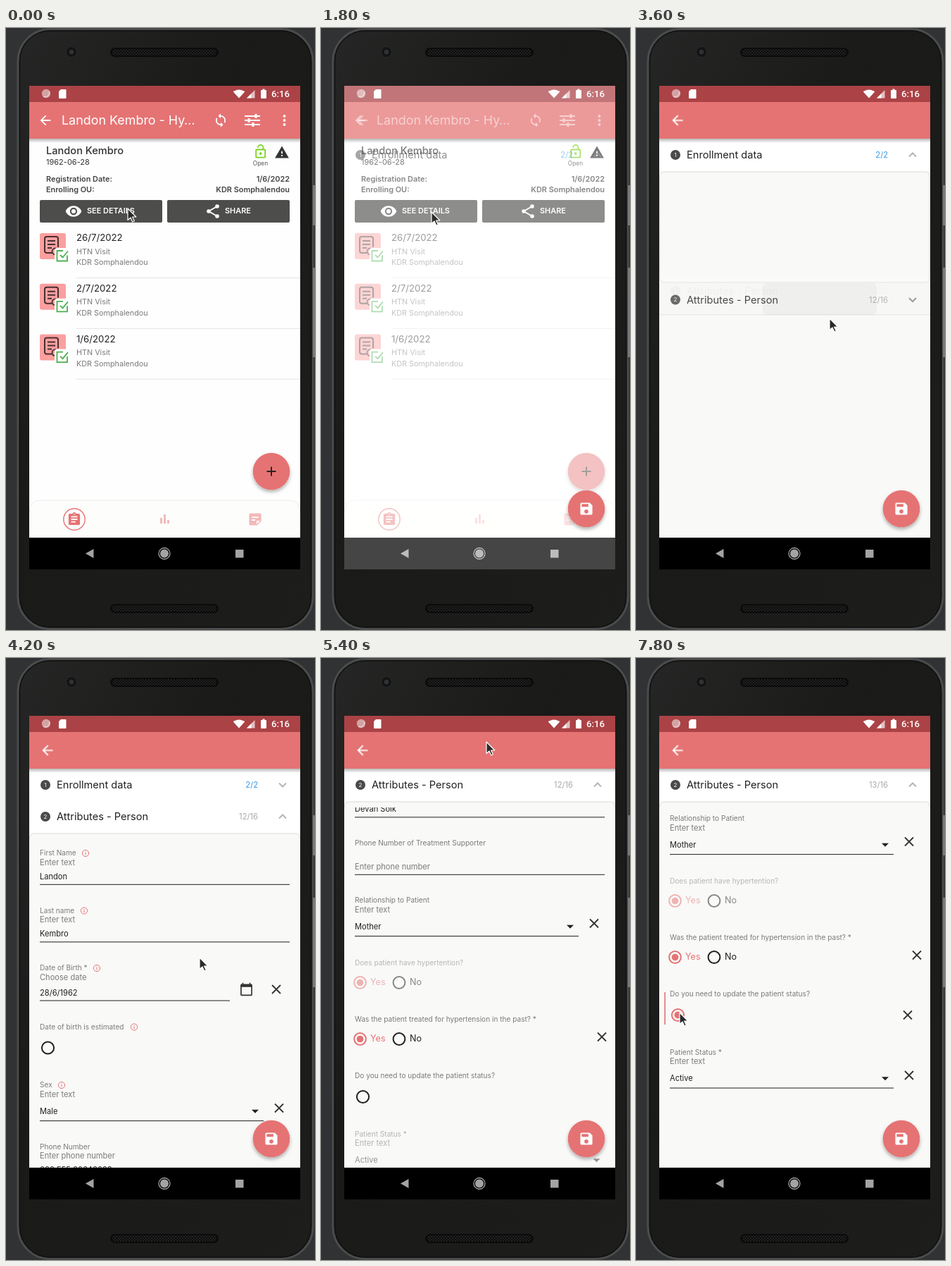
Animation, 439 px wide and 854 px high, one loop 8000 ms. Source, as an HTML page:

```html
<!DOCTYPE html>
<html lang="en">
<head>
<meta charset="utf-8">
<title>Patient enrollment form</title>
<style>
html, body { margin: 0; width: 100%; height: 100%; overflow: hidden; background: #303233; }
svg { display: block; width: 439px; height: 854px; }
text { font-family: Inter, Roboto, sans-serif; white-space: pre; }

.cursor, .flash, .old, .old-head, .old-title, .old-main, .fade, .bg, .save, .panel, .closed, .ripple,
.open, .fields, .head1, .head2, .up1, .down1, .off, .on {
  animation: 8s step-end infinite;
}
.cursor { animation-name: cursor; }
.flash { animation-name: flash; }
.old { animation-name: old; }
.old-head { animation-name: old-head; }
.old-title { animation-name: old-title; }
.old-main { animation-name: old-main; }
.fade { animation-name: fade; }
.bg { animation-name: bg; }
.save { animation-name: save; }
.panel { animation-name: panel; }
.closed { animation-name: closed; }
.ripple { animation-name: ripple; }
.open { animation-name: open; }
.fields { animation-name: fields; }
.head1 { animation-name: head1; }
.head2 { animation-name: head2; }
.up1 { animation-name: up1; }
.down1 { animation-name: down1; }
.off { animation-name: off; }
.on { animation-name: on; }

@keyframes cursor {
  0% { transform: translate(173px, 256px); }
  1.25% { transform: translate(156px, 256px); }
  5% { transform: translate(145px, 258px); }
  6.25% { transform: translate(124px, 262px); }
  7.5% { transform: translate(113px, 268px); }
  8.75% { transform: translate(130px, 266px); }
  10% { transform: translate(165px, 263px); }
  11.25% { transform: translate(189px, 262px); }
  12.5% { transform: translate(156px, 268px); }
  15% { transform: translate(156px, 264px); }
  16.25% { transform: translate(157px, 261px); }
  30% { transform: translate(170px, 275px); }
  31.25% { transform: translate(200px, 330px); }
  32.5% { transform: translate(238px, 392px); }
  33.75% { transform: translate(270px, 430px); }
  35% { transform: translate(275px, 412px); }
  52.5% { transform: translate(275px, 425px); }
  53.75% { transform: translate(273px, 470px); }
  55% { transform: translate(270px, 530px); }
  56.25% { transform: translate(268px, 580px); }
  57.5% { transform: translate(267px, 606px); }
  58.75% { transform: translate(267px, 612px); }
  61.25% { transform: translate(267px, 531px); }
  62.5% { transform: translate(250px, 85px); }
  65% { transform: translate(238px, 4px); }
  67.5% { transform: translate(235px, 119px); }
  68.75% { transform: translate(215px, 200px); }
  70% { transform: translate(180px, 290px); }
  71.25% { transform: translate(140px, 380px); }
  72.5% { transform: translate(95px, 450px); }
  73.75% { transform: translate(55px, 500px); }
  75% { transform: translate(25px, 530px); }
  76.25% { transform: translate(8px, 539px); }
  77.5% { transform: translate(4px, 539px); }
  78.75% { transform: translate(14px, 534px); }
  80% { transform: translate(42px, 520px); }
  81.25% { transform: translate(70px, 508px); }
  82.5% { transform: translate(75px, 505px); }
  83.75%, 100% { transform: translate(62px, 503px); }
}

/* screen change */
@keyframes flash { 0% { opacity: 0; } 20% { opacity: .06; } 21.25% { opacity: .15; } 22.5% { opacity: .27; } 23.75% { opacity: .13; } 25%, 100% { opacity: 0; } }
@keyframes old { 0% { visibility: visible; } 25%, 100% { visibility: hidden; } }
@keyframes old-head { 0% { opacity: 1; } 21.25% { opacity: .95; } 22.5% { opacity: .88; } 23.75% { opacity: .5; } 25%, 100% { opacity: 0; } }
@keyframes old-title { 0% { opacity: 1; } 20% { opacity: .95; } 21.25% { opacity: .8; } 22.5% { opacity: .55; } 23.75% { opacity: .2; } 25%, 100% { opacity: 0; } }
@keyframes old-main { 0% { opacity: 1; } 20% { opacity: .95; } 21.25% { opacity: .8; } 22.5% { opacity: .6; } 23.75% { opacity: .25; } 25%, 100% { opacity: 0; } }
@keyframes fade { 0% { opacity: 0; } 21.25% { opacity: .2; } 22.5% { opacity: .5; } 23.75% { opacity: .8; } 25%, 100% { opacity: 1; } }
@keyframes bg { 0% { opacity: 0; } 23.75% { opacity: .7; } 25%, 100% { opacity: 1; } }
@keyframes save { 0% { opacity: 0; } 21.25% { opacity: .5; } 22.5%, 100% { opacity: 1; } }

/* second section opens */
@keyframes panel { 0% { opacity: 0; } 23.75% { opacity: .7; } 25% { opacity: 1; } 46.25% { opacity: .3; } 47.5%, 100% { opacity: 0; } }
@keyframes closed { 0% { opacity: 0; } 23.75% { opacity: .7; } 25% { opacity: 1; } 45% { opacity: .8; } 46.25% { opacity: .3; } 47.5%, 100% { opacity: 0; } }
@keyframes ripple { 0% { opacity: 0; } 45% { opacity: 1; } 46.25%, 100% { opacity: 0; } }
@keyframes open { 0% { opacity: 0; } 45% { opacity: .18; } 46.25% { opacity: .5; } 47.5% { opacity: .8; } 48.75%, 100% { opacity: 1; } }
@keyframes up1 { 0% { opacity: 1; } 46.25%, 100% { opacity: 0; } }
@keyframes down1 { 0% { opacity: 0; } 46.25%, 100% { opacity: 1; } }

/* scrolling */
@keyframes head1 { 0% { transform: none; } 61.25% { transform: translateY(-18px); } 62.5%, 100% { transform: translateY(-60px); } }
@keyframes head2 {
  0% { transform: translateY(193px); }
  46.25% { transform: translateY(130px); }
  47.5% { transform: translateY(70px); }
  48.75% { transform: translateY(45px); }
  61.25% { transform: translateY(27px); }
  62.5%, 100% { transform: none; }
}
@keyframes fields {
  0% { transform: translateY(148px); visibility: hidden; }
  46.25% { transform: translateY(85px); visibility: visible; }
  47.5% { transform: translateY(25px); }
  48.75% { transform: none; }
  61.25% { transform: translateY(-18px); }
  62.5% { transform: translateY(-465px); }
  65% { transform: translateY(-545px); }
  67.5% { transform: translateY(-594px); }
  68.75% { transform: translateY(-640px); }
  70% { transform: translateY(-676px); }
  71.25% { transform: translateY(-698px); }
  72.5% { transform: translateY(-708px); }
  73.75%, 100% { transform: translateY(-710px); visibility: visible; }
}

/* status switched on */
@keyframes off { 0% { opacity: 1; } 93.75% { opacity: .75; } 95% { opacity: .5; } 96.25% { opacity: .25; } 97.5%, 100% { opacity: 0; } }
@keyframes on { 0% { opacity: 0; } 93.75% { opacity: .25; } 95% { opacity: .5; } 96.25% { opacity: .75; } 97.5%, 100% { opacity: 1; } }
</style>
</head>
<body>
<script>
const RED = '#e57373', INK = '#212121', GREY = '#7b7b7b', PAPER = '#f9f9f8';

const PATHS = {
  back: 'M20 11H7.83l5.59-5.59L12 4l-8 8 8 8 1.41-1.41L7.83 13H20z',
  sync: 'M12 4V1L8 5l4 4V6c3.31 0 6 2.69 6 6 0 1.01-.25 1.97-.7 2.8l1.46 1.46A7.93 7.93 0 0 0 20 12c0-4.42-3.58-8-8-8zm0 14c-3.31 0-6-2.69-6-6 0-1.01.25-1.97.7-2.8L5.24 7.74A7.93 7.93 0 0 0 4 12c0 4.42 3.58 8 8 8v3l4-4-4-4z',
  lock: 'M12 17a2 2 0 1 0 0-4 2 2 0 0 0 0 4zm6-9h-1V6A5 5 0 0 0 7 6h1.900a3.100 3.100 0 0 1 6.200 0v2H6a2 2 0 0 0-2 2v10a2 2 0 0 0 2 2h12a2 2 0 0 0 2-2V10a2 2 0 0 0-2-2zm0 12H6V10h12z',
  eye: 'M12 4.5C7 4.5 2.73 7.61 1 12c1.73 4.39 6 7.5 11 7.5s9.27-3.11 11-7.5c-1.73-4.39-6-7.5-11-7.5zM12 17a5 5 0 1 1 0-10 5 5 0 0 1 0 10zm0-8a3 3 0 1 0 0 6 3 3 0 0 0 0-6z',
  warn: 'M1 21h22L12 2zm12-3h-2v-2h2zm0-4h-2v-4h2z',
  task: 'M19 3h-4.18C14.4 1.84 13.3 1 12 1s-2.4.84-2.82 2H5a2 2 0 0 0-2 2v14a2 2 0 0 0 2 2h14a2 2 0 0 0 2-2V5a2 2 0 0 0-2-2zm-7 0a1 1 0 1 1 0 2 1 1 0 0 1 0-2zm2 14H7v-2h7zm3-4H7v-2h10zm0-4H7V7h10z',
  note: 'M19 3H5a2 2 0 0 0-2 2v14a2 2 0 0 0 2 2h10l6-6V5a2 2 0 0 0-2-2zM7 8h10v2H7zm5 6H7v-2h5zm2 5.5V14h5.5z',
  save: 'M17 3H5a2 2 0 0 0-2 2v14a2 2 0 0 0 2 2h14a2 2 0 0 0 2-2V7zm-5 16a3 3 0 1 1 0-6 3 3 0 0 1 0 6zm3-10H5V5h10z',
  date: 'M20 3h-1V1h-2v2H7V1H5v2H4a2 2 0 0 0-2 2v16c0 1.1.9 2 2 2h16a2 2 0 0 0 2-2V5a2 2 0 0 0-2-2zm0 18H4V8h16z',
  wifi: 'M12 21L0 7.5C3 5 7.3 3 12 3s9 2 12 4.5z'
};

const group = (cls, ...parts) => `<g class="${cls}">${parts.join('')}</g>`;
const rect = (x, y, w, h, fill, more = '') => `<rect x="${x}" y="${y}" width="${w}" height="${h}" fill="${fill}" ${more}/>`;
const dot = (x, y, r, fill, more = '') => `<circle cx="${x}" cy="${y}" r="${r}" fill="${fill}" ${more}/>`;
const ring = (x, y, r, color, w) => dot(x, y, r, 'none', `stroke="${color}" stroke-width="${w}"`);
const line = (d, color, w, more = '') => `<path d="${d}" fill="none" stroke="${color}" stroke-width="${w}" ${more}/>`;
const shape = (d, fill) => `<path d="${d}" fill="${fill}"/>`;
const text = (x, y, s, size, fill, more = '') => `<text x="${x}" y="${y}" font-size="${size}" fill="${fill}" ${more}>${s}</text>`;
const icon = (name, x, y, k, fill) =>
  `<path transform="translate(${x} ${y}) scale(${k}) translate(-12 -12)" fill-rule="evenodd" d="${PATHS[name]}" fill="${fill}"/>`;
const END = ' text-anchor="end"', MID = ' text-anchor="middle"', MEDIUM = ' font-weight="500"', BOLD = ' font-weight="600"';

function phone() {
  const grille = y => rect(148, y, 154, 13, '#0b0b0b', 'rx="6.5"') + rect(151, y + 2, 148, 9, 'url(#mesh)', 'rx="4.5"');
  return rect(0, 0, 439, 854, '#303233') +
    rect(17, 1.5, 419, 851, 'url(#body)', 'rx="46" stroke="#4a4c4c" stroke-width="3"') +
    rect(19.5, 4, 414, 846, 'none', 'rx="43" stroke="#111" stroke-width="1.5"') +
    rect(436, 223, 3, 57, '#77797a') + rect(436, 340, 3, 127, '#77797a') +
    dot(93, 34, 7.5, '#141414', 'stroke="#2a2a2a" stroke-width="1"') + dot(93, 34, 3.2, '#2f3436') +
    grille(28) + grille(817);
}

function systemBars() {
  return rect(33, 82, 385, 686, '#fefefe') + rect(33, 82, 385, 23, '#ab4246') + rect(33, 105, 385, 52, RED) +
    dot(57, 93, 6.2, '#d3a3a4') + line('M53 97a5.6 5.6 0 0 0 8-7', '#ecd3d3', 1.2) +
    shape('M78 87h6.5q1 0 1 1v11q0 1-1 1h-8.5q-1 0-1-1v-9z', '#fff') +
    icon('wifi', 331, 93.5, .68, '#fff') +
    shape('M342 99.5h11.5V88z', '#e3bfc0') + shape('M342 99.5h6.5v-6.5z', '#fff') +
    rect(362, 88, 8, 12, '#fff', 'rx="1"') + rect(364.5, 86.5, 3, 2, '#fff') +
    text(403, 98, '6:16', 13.2, '#fff', END + MEDIUM + ' style="font-family:Roboto,sans-serif"') +
    rect(33, 723, 385, 45, '#000') +
    shape('M113 745.5l11.5-6.5v13z', '#a3a3a3') +
    dot(225, 745.5, 6, '#a3a3a3') + ring(225, 745.5, 8, '#a3a3a3', 1.3) + rect(326, 740, 11.5, 11.5, '#a3a3a3');
}

const fab = (y, inner) => dot(377, y, 26.3, RED, 'filter="url(#lift)"') + inner;

function visit(i, date) {
  return `<g transform="translate(0 ${i * 71.8})">` +
    rect(48, 291, 37, 37, '#fb9f9f', 'rx="3"') +
    line('M66 319H58q-3 0-3-3V299q0-3 3-3h13q3 0 3 3v12M59 302h11M59 307h11M59 312h6', '#4a2f30', 2) +
    ring(70, 317, 4.5, '#4a2f30', 1.8) +
    rect(69, 312, 21, 21, '#fff', 'rx="4"') +
    line('M81 316h-8.5v14.5h14.5v-8M77 322l3.5 3.5 7.5-9', '#4caf50', 1.8) +
    text(100, 302, date, 13.2, INK) +
    text(100, 320.5, 'HTN Visit', 10.8, GREY) + text(100, 336.3, 'KDR Somphalendou', 10.8, GREY) +
    rect(100, 354, 318, 1, '#e3e3e3') + '</g>';
}

function overview() {
  const button = x => rect(x, 244, 174, 32, '#4d4d4c', 'rx="2"');
  const slider = (y, x) => rect(339, y - 1, 22, 2, '#fff') + rect(x - 1.5, y - 3, 3, 6, '#fff');
  const fact = (y, label, value) => text(57, y, label, 10.9, '#444', BOLD) + text(403, y, value, 10.9, '#444', END + BOLD);
  const title = group('old-title',
    icon('back', 56, 131, .92, '#fff'), text(79, 137, 'Landon Kembro - Hy…', 17.9, '#fff'),
    icon('sync', 305, 131, .88, '#fff'), slider(125, 355), slider(131, 345), slider(137, 351),
    [125, 131, 137].map(y => dot(395.5, y, 1.9, '#fff')).join(''));
  const head = group('old-head',
    text(57, 178.5, 'Landon Kembro', 14.6, '#333', MEDIUM), text(57, 193.5, '1962-06-28', 11, '#333'),
    icon('lock', 361.7, 175.3, .93, '#7ed321'),
    text(361.5, 195, 'Open', 8.4, '#555', MID), icon('warn', 392, 176.5, .9, '#333'),
    fact(218, 'Registration Date:', '1/6/2022'), fact(232.5, 'Enrolling OU:', 'KDR Somphalendou'),
    button(48), button(229), icon('eye', 96, 260, 1.03, '#fff'),
    line('M300 253L288 260l12 7', '#fff', 2), dot(300, 253, 2.8, '#fff'), dot(288, 260, 2.8, '#fff'), dot(300, 267, 2.8, '#fff'),
    text(115, 263.3, 'SEE DETAILS', 10.9, '#fff', BOLD), text(311, 263.3, 'SHARE', 10.9, '#fff', BOLD));
  const main = group('old-main',
    ['26/7/2022', '2/7/2022', '1/6/2022'].map((d, i) => visit(i, d)).join(''),
    shape('M33 723V686q0-16 16-16H402q16 0 16 16v37z', '#fdfdfc'),
    line('M33.5 686q0-16 16-16H401.5q16 0 16 16', '#ececec', 1),
    ring(97, 697, 15.2, RED, 1.4), icon('task', 97, 697, .9, RED),
    rect(219, 695, 3, 8, '#f3b9b9'), rect(224, 690, 3, 13, '#f3b9b9'), rect(229, 698, 3, 5, '#f3b9b9'),
    icon('note', 354, 697, .95, '#f3b9b9'),
    fab(629, line('M370.5 629h13M377 622.5v13', '#2b2222', 2)));
  return group('old', title, main, head);
}

const chevron = (up, cls = '', color = '#b5b5b5') =>
  line(up ? 'M388 182.5l5-5 5 5' : 'M388 177.5l5 5 5-5', color, 2, `class="${cls}"`);

const heading = (n, s) => dot(56, 180, 7, '#4a4a4a') + text(56, 182.8, n, 8, '#fff', MID) + text(72, 185, s, 14.6, INK);
const count = (s, fill, cls = '') => text(358, 184, s, 11.2, fill, `${END} class="${cls}"`);
const panelTop = () => `<path d="M34 212V210Q34 204 40 204H411Q417 204 417 210V212" fill="${PAPER}" stroke="#ebebea" stroke-width="2"/>`;

// Fields: y is the middle of the label.
const small = (x, y, s, fill = GREY) => text(x, y + 3.7, s, 10.1, fill);
const body = (y, s, fill = INK) => text(48, y + 4, s, 11.1, fill);
const cross = (x, y) => line(`M${x - 6} ${y - 6}l12 12m0-12l-12 12`, '#333', 1.8);
const caret = (x, y, fill = INK) => shape(`M${x - 5} ${y - 2.3}h10l-5 5z`, fill);
const rule = (y, end, color = '#333') => rect(48, y - .5, end - 48, 1.1, color);
const info = (x, y) => ring(x, y + .5, 4.6, RED, 1) + rect(x - .5, y - .2, 1, 3.2, RED) + rect(x - .5, y - 2, 1, 1.1, RED);

const entry = (y, label, hint, value, mark) =>
  small(48, y, label) + (mark ? info(mark, y) : '') + body(y + 13, hint, GREY) +
  body(y + 33, value) + rule(y + 44.8, 403);

const choice = (y, label, value, mark) =>
  small(48, y, label) + (mark ? info(mark, y) : '') + body(y + 13, 'Enter text', GREY) + body(y + 37, value) +
  caret(354, y + 37.5) + rule(y + 51, 366) + cross(388, y + 33);

const yesNo = (y, label) =>
  small(48, y, label) + ring(55.5, y + 28.5, 8.4, RED, 2) + dot(55.5, y + 28.5, 4.8, RED) +
  text(70, y + 32, 'Yes', 12.6, RED) + ring(111, y + 28.5, 8.4, INK, 2) + text(126, y + 32, 'No', 12.6, INK);

function fields() {
  return group('fields', group('open',
    entry(276.5, 'First Name', 'Enter text', 'Landon', 113),
    entry(358, 'Last name', 'Enter text', 'Kembro', 111),
    small(48, 439.5, 'Date of Birth *'), info(129, 439.5), body(452.5, 'Choose date', GREY), body(474.5, '28/6/1962'),
    rule(486, 318), icon('date', 341.5, 470, .84, '#333'), cross(384, 470),
    small(48, 523, 'Date of birth is estimated'), info(182, 523), ring(59.5, 553, 8.6, INK, 2),
    choice(605.5, 'Sex', 'Male', 79),
    entry(693, 'Phone Number', 'Enter phone number', '000 555 00640028'),
    entry(775, 'Name of Treatment Supporter', 'Enter text', 'Devan Solk'),
    small(48, 856.5, 'Phone Number of Treatment Supporter'), body(889.5, 'Enter phone number', GREY), rule(901.3, 403),
    choice(937.5, 'Relationship to Patient', 'Mother'),
    `<g opacity=".52">${yesNo(1026, 'Does patient have hypertention?')}</g>`,
    yesNo(1106, 'Was the patient treated for hypertension in the past? *'), cross(399, 1131.5),
    small(48, 1186.5, 'Do you need to update the patient status?'),
    group('off', ring(59.5, 1216.5, 8.6, INK, 2), `<g opacity=".55">`,
      small(48, 1269, 'Patient Status *'), body(1282, 'Enter text', GREY), body(1306, 'Active', '#444'),
      caret(391.5, 1306.5, '#444'), rule(1320, 403), '</g>'),
    group('on', rect(40.3, 1184, 1.6, 46, RED), ring(59.5, 1216.5, 8.6, RED, 2), dot(59.5, 1216.5, 5, RED), cross(386, 1216.5),
      choice(1269, 'Patient Status *', 'Active'))));
}

function form() {
  const first = group('head1', group('bg', rect(33, 157, 385, 46, '#fff')),
    group('fade', heading(1, 'Enrollment data'), count('2/2', '#3d9be9'),
      chevron(true, 'up1'), chevron(false, 'down1')));
  const panel = group('panel', rect(34, 204, 383, 157, PAPER, 'rx="6" stroke="#ebebea" stroke-width="2"'));
  const closed = group('closed', rect(33, 362, 385, 45, '#fdfdfc'), rect(33, 406, 385, 1.5, '#ececeb'),
    `<g transform="translate(0 205.5)">${heading(2, 'Attributes - Person')}${count('12/16', '#aaa')}${chevron(false, '', '#8a8a8a')}</g>`);
  const ripple = group('ripple', rect(33, 362, 385, 45, '#000', 'opacity=".02"'),
    rect(180, 362, 162, 45, '#000', 'rx="6" opacity=".03"'));
  const second = group('head2', group('open', rect(33, 157, 385, 54, '#fff'), panelTop(),
    heading(2, 'Attributes - Person'), count('12/16', '#aaa', 'off'), count('13/16', '#aaa', 'on'), chevron(true)));
  return group('fade', icon('back', 59, 131, .95, '#fff')) +
    `<g clip-path="url(#view)">` + group('bg', rect(33, 157, 385, 566, PAPER)) + panel +
    fields() + first + second + closed + ripple + '</g>' +
    rect(33, 157, 385, 6, 'url(#shade)') +
    group('save', fab(682, icon('save', 377, 682, .95, '#fff')));
}

const defs = `<defs>
  <linearGradient id="body" x1="0" y1="0" x2="1" y2="1">
    <stop offset="0" stop-color="#252625"/><stop offset=".4" stop-color="#1a1a18"/><stop offset="1" stop-color="#1d1d1b"/>
  </linearGradient>
  <linearGradient id="shade" x1="0" y1="0" x2="0" y2="1">
    <stop offset="0" stop-opacity=".28"/><stop offset="1" stop-opacity="0"/>
  </linearGradient>
  <pattern id="mesh" width="4" height="4" patternUnits="userSpaceOnUse">
    <circle cx="1" cy="1" r=".9" fill="#2c2c2c"/><circle cx="3" cy="3" r=".9" fill="#2c2c2c"/>
  </pattern>
  <filter id="lift" x="-30%" y="-30%" width="160%" height="170%">
    <feDropShadow dx="0" dy="3" stdDeviation="2.5" flood-opacity=".3"/>
  </filter>
  <clipPath id="view"><rect x="33" y="157" width="385" height="566"/></clipPath>
</defs>`;

const pointer = group('cursor',
  '<path d="M0 0V16.5L4 13 6.8 19 9.3 17.8 6.6 12H11.8Z" fill="#2a2a2a" stroke="#fff" stroke-width="1.2" stroke-linejoin="round"/>');

document.body.innerHTML = `<svg viewBox="0 0 439 854" xmlns="http://www.w3.org/2000/svg">${defs}` +
  phone() + systemBars() + overview() + group('flash', rect(33, 82, 385, 686, '#fff')) + form() + pointer + '</svg>';
</script>
</body>
</html>
```
